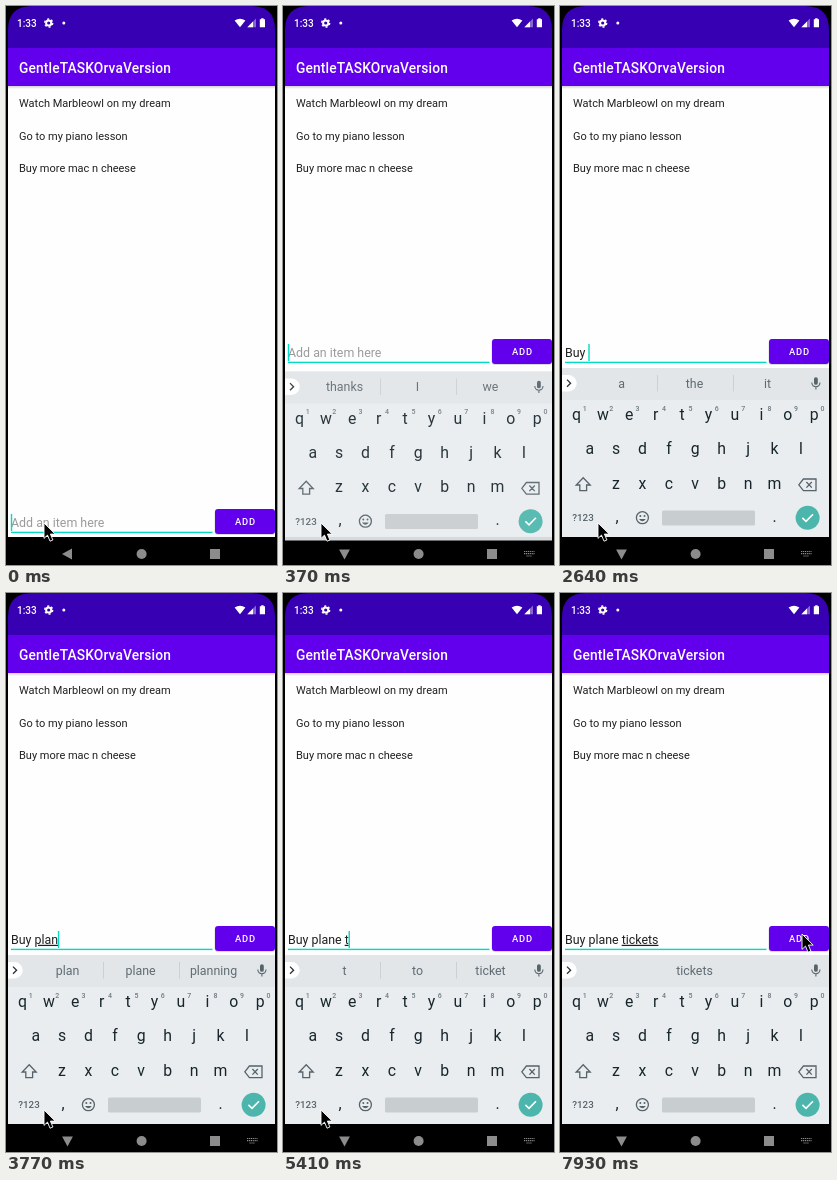
Recreate the animation shown at these times as an HTML page. Size 271 by 559 pixels, loop 8000 ms.

```html
<!DOCTYPE html>
<html lang="en">
<head>
<meta charset="utf-8">
<title>To-do list</title>
<style>
  html, body { margin: 0; width: 100%; height: 100%; overflow: hidden; background: #000; }
  svg { display: block; width: 271px; height: 559px; font-family: Roboto, sans-serif; }
  text { white-space: pre; }
  .mid { text-anchor: middle; }
  .item { font-size: 11px; fill: #202020; }
  .field { font-size: 12.4px; }
  .key { font-size: 15.8px; fill: #18262c; }
  .digit { font-size: 7px; font-weight: 500; fill: #6f7a80; }
  .hint { font-size: 12.4px; fill: #5f6b72; }
  .line { fill: none; stroke: #56636a; stroke-width: 1.3; }
  #word { text-decoration: underline 1px; text-underline-offset: 1.5px; }
</style>
</head>
<body>
<svg viewBox="0 0 271 559">
  <defs>
    <clipPath id="screen"><path d="M2 559V24Q2 0 26 0H245Q269 0 269 24V559Z"/></clipPath>
    <linearGradient id="shade" x2="0" y2="1">
      <stop stop-color="#000" stop-opacity=".18"/>
      <stop offset="1" stop-color="#000" stop-opacity="0"/>
    </linearGradient>
  </defs>
  <rect width="271" height="559"/>

  <g clip-path="url(#screen)">
    <rect x="2" width="267" height="42" fill="#3700b3"/>
    <rect x="2" y="80" width="267" height="451" fill="#fefefe"/>
    <rect x="2" y="42" width="267" height="38" fill="#6200ee"/>
    <rect x="2" y="80" width="267" height="3" fill="url(#shade)"/>
  </g>
  <g fill="#fff">
    <text x="11" y="20.8" font-size="10" font-weight="500">1:33</text>
    <circle cx="42.7" cy="17" r="2.6" fill="none" stroke="#fff" stroke-width="2"/>
    <circle cx="42.7" cy="17" r="4" fill="none" stroke="#fff" stroke-width="1.4" stroke-dasharray="2.1 2.09"/>
    <circle cx="57.8" cy="17" r="1.5"/>
    <path d="M228.6 14.6Q234 10.8 239.4 14.6L234 21.2Z"/>
    <path d="M250 12.5V21.2H241.4Z" opacity=".4"/>
    <path d="M247 15.5V21.2H241.4Z"/>
    <path d="M253.8 13.3H255.2V12.3H257.6V13.3H259V21.2H253.8Z"/>
    <text x="13" y="66.7" font-size="13.75" font-weight="500" letter-spacing=".15">GentleTASKOrvaVersion</text>
  </g>
  <text class="item" x="13" y="101">Watch Marbleowl on my dream</text>
  <text class="item" x="13" y="133.6">Go to my piano lesson</text>
  <text class="item" x="13" y="166.2">Buy more mac n cheese</text>

  <g id="entry">
    <text id="empty" class="field" x="5" y="350.8" fill="#9b9b9b">Add an item here</text>
    <text id="typed" class="field" x="5" y="350.8" fill="#202020"><tspan id="done"></tspan><tspan id="word"></tspan></text>
    <rect x="5" y="355.7" width="201.5" height="1.4" fill="#03dac5"/>
    <rect id="caret" y="338" width="1.4" height="17" fill="#03dac5"/>
    <rect x="208.5" y="333.5" width="60.5" height="25.5" rx="3.5" fill="#000" opacity=".14"/>
    <rect x="209" y="333" width="60" height="25" rx="3" fill="#6200ee"/>
    <text class="mid" x="239.5" y="349" font-size="9.4" font-weight="500" letter-spacing=".8" fill="#fff">ADD</text>
  </g>

  <g id="board">
    <rect x="2" y="362" width="267" height="169" fill="#e9edf0"/>
    <rect x="2" y="362" width="267" height="32" fill="#e2e6e9"/>
    <path d="M2 369H8.5A8.2 8.2 0 0 1 8.5 385.4H2Z" fill="#fff"/>
    <path d="M7 373.6L10.6 377.2L7 380.8" class="line" style="stroke:#263238"/>
    <path id="bars" d="M97.5 369V385.5M173.5 369V385.5" stroke="#cbd0d4"/>
    <g id="hints"></g>
    <rect x="254" y="371.2" width="3.8" height="7.6" rx="1.9" fill="#56636a"/>
    <path d="M251.8 376.6A4.1 4.1 0 0 0 260 376.6M255.9 380.8V383.4" class="line" style="stroke-width:1.1"/>
    <g id="keys"></g>
    <path d="M23.2 471.8L30.2 479H26.6V484.6H19.8V479H16.2Z" class="line"/>
    <path d="M238.8 478.8L243.4 473H256V484.6H243.4ZM246.4 476L251.8 481.6M251.8 476L246.4 481.6" class="line"/>
    <text class="mid" x="23" y="515" font-size="9.8" font-weight="500" fill="#56636a">?123</text>
    <circle cx="82.4" cy="511.7" r="6" class="line"/>
    <g fill="#56636a"><circle cx="80.3" cy="509.9" r="1"/><circle cx="84.5" cy="509.9" r="1"/><path d="M79 513H85.8Q82.4 517.5 79 513Z"/></g>
    <rect x="102" y="504.5" width="93" height="15" rx="1.5" fill="#c8cdd0"/>
    <circle cx="247.6" cy="511.7" r="12" fill="#4db6ac"/>
    <path d="M242.4 511.9L246 515.4L253 508.2" fill="none" stroke="#fff" stroke-width="1.6"/>
  </g>

  <g fill="#8c8c8c">
    <path id="back" d="M56 548L66 542.6V553.4Z"/>
    <circle cx="135.6" cy="548" r="5"/>
    <rect x="204" y="543" width="10" height="10"/>
    <path id="switch" d="M241 545.5H251.5M241 547.6H251.5M243.5 550H249" stroke="#8c8c8c" stroke-width="1.1" stroke-dasharray="1.2 .7"/>
  </g>
  <path id="mouse" d="M0 0V15.4L3.5 12.1L6 18.2L8.9 17L6.4 11.1H11.2Z" stroke="#fff" stroke-width=".9"/>
</svg>
<script>
const LOOP = 8000;
const $ = id => document.getElementById(id);
const show = (id, on) => $(id).setAttribute('visibility', on ? 'visible' : 'hidden');

function addText(parent, cls, x, y, str) {
  const el = document.createElementNS('http://www.w3.org/2000/svg', 'text');
  el.setAttribute('class', cls + ' mid');
  el.setAttribute('x', x);
  el.setAttribute('y', y);
  el.textContent = str;
  $(parent).append(el);
  return el;
}

const PITCH = 26.4;
[['qwertyuiop', 16.5, 414], ['asdfghjkl', 29.7, 448.3], ['zxcvbnm', 56, 482.5]].forEach(([row, x, y]) =>
  [...row].forEach((c, i) => addText('keys', 'key', x + i * PITCH, y, c)));
[...'1234567890'].forEach((c, i) => addText('keys', 'digit', 24.8 + i * PITCH, 404.6, c));
addText('keys', 'key', 57, 515.5, ',');
addText('keys', 'key', 214.6, 515.5, '.');
const hints = [61.5, 134.5, 207.5].map(x => addText('hints', 'hint', x, 381.5, ''));

// time, finished text, word being typed, suggestions
const typing = [
  [0, '', '', 'thanks I we'],
  [1510, '', 'B', 'B Be But'],
  [1760, '', 'Bu', 'Bu But Busy'],
  [2010, '', 'Buy', 'Buy Buyer Buying'],
  [2640, 'Buy ', '', 'a the it'],
  [3400, 'Buy ', 'pl', 'pl place please'],
  [3650, 'Buy ', 'pla', 'pla play place'],
  [3770, 'Buy ', 'plan', 'plan plane planning'],
  [4150, 'Buy plan ', '', 'for to and'],
  [4530, 'Buy ', 'plan', 'plan plane planning'],
  [4650, 'Buy ', 'plane', 'plane planes planets'],
  [4900, 'Buy plane ', '', 'in the ticket'],
  [5410, 'Buy plane ', 't', 't to ticket'],
  [5530, 'Buy plane ', 'ti', 'ti tie ticket'],
  [5780, 'Buy plane ', 'tic', 'tic tick tickets'],
  [5900, 'Buy plane ', 'tick', 'tick ticket tickets'],
  [6150, 'Buy plane ', 'ticke', 'ticke ticket tickets'],
  [6270, 'Buy plane ', 'ticket', 'ticket tickets ticketholder'],
  [6520, 'Buy plane ', 'tickets', ' tickets ']
];
const caretOff = [[490, 1000], [2520, 2640], [3150, 3400], [7030, 7520], [7930, LOOP]];
const pointer = [[0, 38, 517], [7280, 80, 480], [7400, 152, 408], [7520, 212, 352], [7680, 242, 341]];
const at = (list, t) => list.findLast(step => step[0] <= t);

function draw(t) {
  const [, done, word, words] = at(typing, t);
  const open = t >= 370;
  const settled = t >= 490;

  $('done').textContent = done;
  $('word').textContent = word;
  show('empty', !done && !word);
  $('entry').setAttribute('transform', `translate(0 ${t < 120 ? 170 : 0})`);
  $('caret').setAttribute('x', 4.8 + $('typed').getComputedTextLength());
  show('caret', !caretOff.some(([from, to]) => t >= from && t < to));

  words.split(' ').forEach((w, i) => hints[i].textContent = w);
  show('bars', open && t < 6520);
  show('board', open);
  show('switch', open);
  $('board').setAttribute('transform', `translate(0 ${settled ? 0 : 3.5})`);
  $('board').setAttribute('opacity', settled ? 1 : .92);
  $('back').setAttribute('transform', open ? 'rotate(-90 61.5 548)' : '');

  const [, x, y] = at(pointer, t);
  $('mouse').setAttribute('transform', `translate(${x} ${y})`);
}

const start = performance.now();
function tick() {
  draw((performance.now() - start) % LOOP);
  requestAnimationFrame(tick);
}
tick();
</script>
</body>
</html>
```
